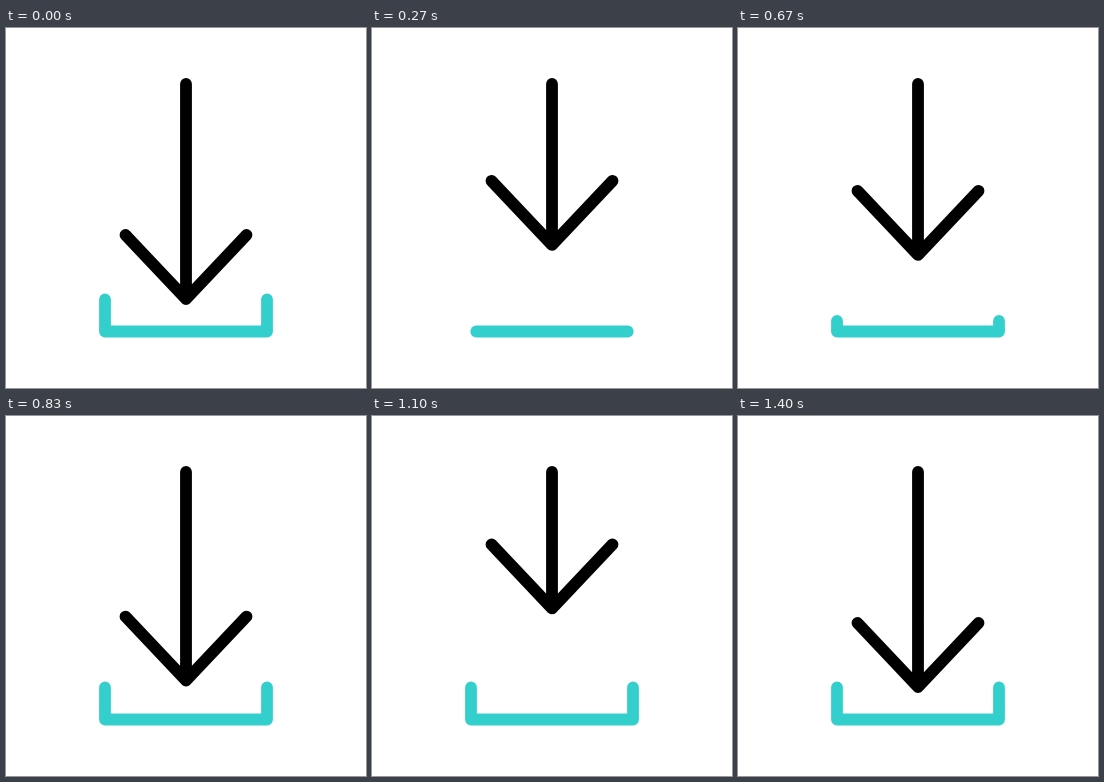
Recreate the animation shown at these times as an HTML page. Size 360 by 360 pixels, loop 2000 ms.

```html
<!DOCTYPE html>
<html lang="en">
<head>
<meta charset="utf-8">
<title>Download</title>
<style>
  html, body { margin: 0; height: 100%; overflow: hidden; background: #fff; }
  svg { display: block; width: 100%; height: 100%; }
  path { fill: none; stroke-width: 11.8; stroke-linecap: round; stroke-linejoin: round; }
</style>
</head>
<body>
<svg viewBox="0 0 360 360">
  <path id="tray" stroke="#33cfcd" d="M99 271.5V303.5H261V271.5"/>
  <path id="arrow" stroke="#000"/>
</svg>
<script>
const LOOP = 2000, FPS = 30, HALF_TRAY = 113;
const tray = document.getElementById('tray');
const arrow = document.getElementById('arrow');

// [frame, value] keys, eased in and out between neighbours
const liftKeys = [[0, 0], [15.5, 103.3], [23.7, 0], [31.35, 84], [42, 0]];
const trayKeys = [[0, HALF_TRAY], [15, HALF_TRAY * 0.4], [23, HALF_TRAY]];

function valueAt(keys, frame) {
  const next = keys.findIndex(([at]) => at > frame);
  if (next < 0) return keys[keys.length - 1][1];
  const [t0, a] = keys[next - 1], [t1, b] = keys[next];
  const s = (frame - t0) / (t1 - t0);
  return a + (b - a) * s * s * (3 - 2 * s);
}

function draw(ms) {
  const frame = Math.floor((ms % LOOP) * FPS / 1000 + 0.11);
  const tip = 271 - valueAt(liftKeys, frame);
  const wing = tip - 64;
  arrow.setAttribute('d', `M180 56V${tip}M119.5 ${wing}L180 ${tip}L240.5 ${wing}`);

  const half = valueAt(trayKeys, frame);
  tray.setAttribute('stroke-dasharray', `${2 * half} 300`);
  tray.setAttribute('stroke-dashoffset', half - HALF_TRAY);
}

const start = performance.now();
function tick() {
  draw(performance.now() - start);
  requestAnimationFrame(tick);
}
tick();
</script>
</body>
</html>
```
